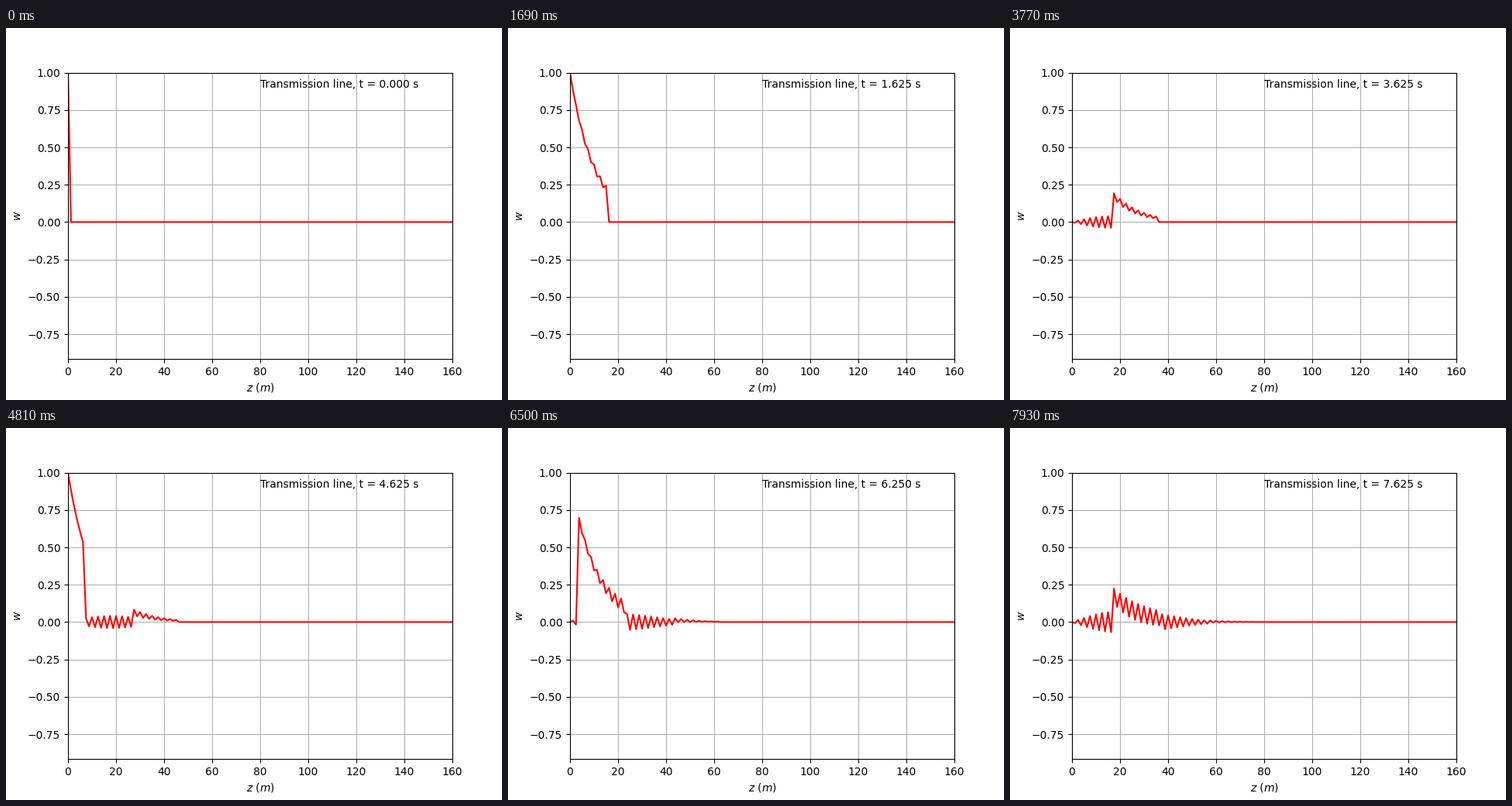
Write a matplotlib script that moves like this. It is 640 px wide and 480 px high and loops after 8000 ms.

```python
import numpy as np
import matplotlib.pyplot as plt
from matplotlib.animation import FuncAnimation

# Telegraph equation w_tt + a w_t + b w = c^2 w_zz at Courant number 1
LENGTH, CELLS = 160, 128
SPEED = 10.0
A, B = 2.0, 1.0
DT = LENGTH / CELLS / SPEED

LOOP_MS, STEP_MS, INTERVAL = 8000, 130, 40
STEPS = LOOP_MS // STEP_MS + 1


def source(n):
    """Square wave feeding the left end: 2 s on, 2 s off."""
    return 1.0 if (n // 16) % 2 == 0 else 0.0


def simulate():
    w = np.zeros((STEPS, CELLS + 1))
    w[0, 0] = w[1, 0] = source(0)
    damp = A * DT / 2
    for n in range(1, STEPS - 1):
        now, old = w[n], w[n - 1]
        w[n + 1, 1:-1] = (now[2:] + now[:-2] - B * DT**2 * now[1:-1]
                          - (1 - damp) * old[1:-1]) / (1 + damp)
        w[n + 1, 0] = source(n + 1)
    return w


z = np.linspace(0, LENGTH, CELLS + 1)
waves = simulate()

fig, ax = plt.subplots(figsize=(6.4, 4.8), dpi=100)
ax.set(xlim=(0, LENGTH), ylim=(-0.917, 1), xlabel=r"$z\ (m)$", ylabel="$w$")
ax.grid(True)
line, = ax.plot(z, waves[0], "r-")
label = ax.text(80, 0.9, "")


def update(i):
    n = min((i * INTERVAL + INTERVAL - 1) // STEP_MS, STEPS - 1)
    line.set_ydata(waves[n])
    label.set_text(f"Transmission line, t = {n * DT:.3f} s")
    return line, label


anim = FuncAnimation(fig, update, frames=LOOP_MS // INTERVAL,
                     interval=INTERVAL, repeat=True, repeat_delay=0)
plt.show()
```
